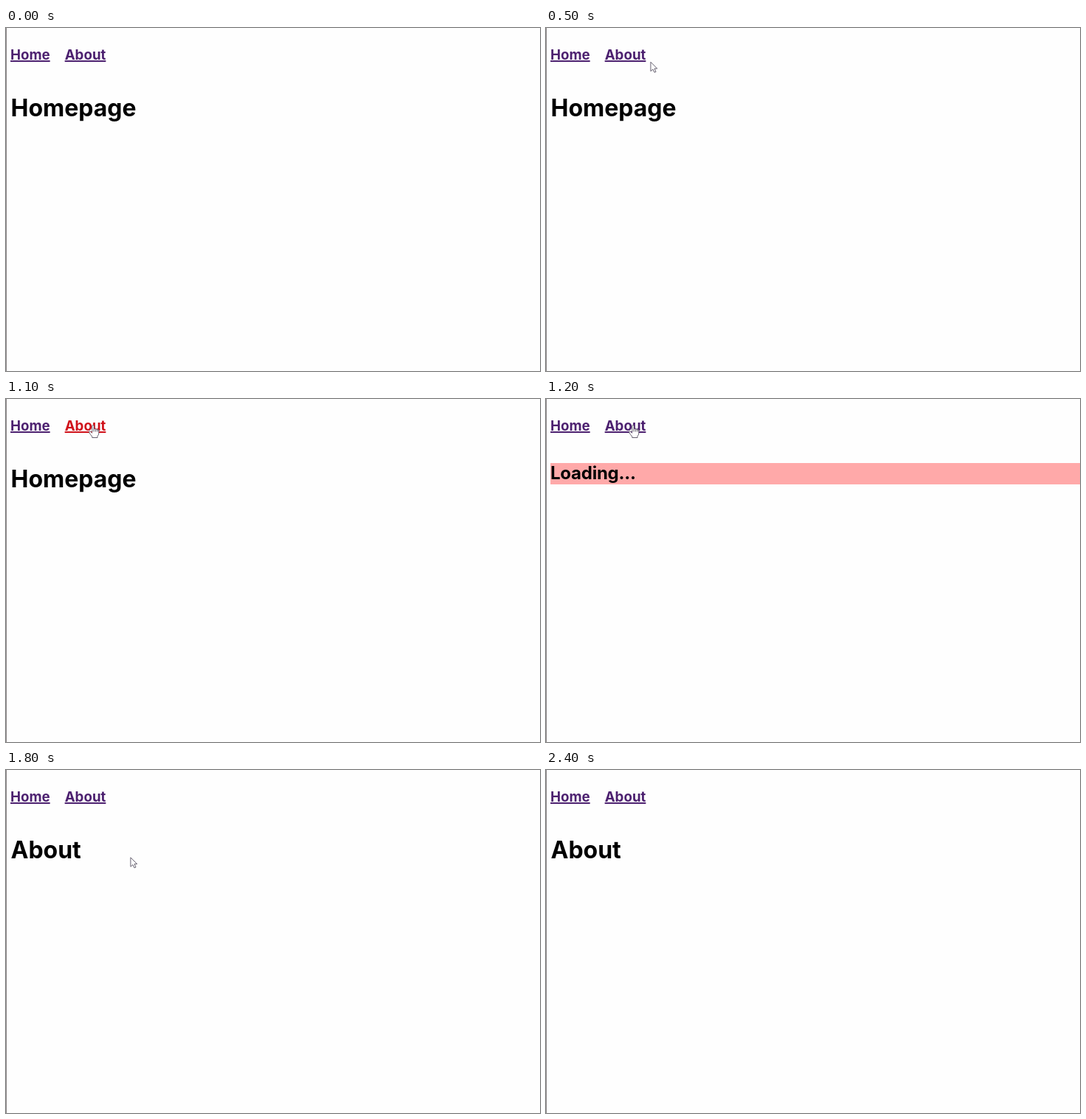
Write an HTML page that moves like this. It is 724 by 466 pixels and loops after 2.6 s.

```html
<!DOCTYPE html>
<html lang="en">
<head>
<meta charset="utf-8">
<title>Page navigation</title>
<style>
  html, body { margin: 0; width: 100%; height: 100%; overflow: hidden; background: #fefefe; }
  body { position: relative; font-family: Inter, sans-serif; font-weight: 700; color: #000; }
  body::before { content: ""; position: absolute; left: 0; top: 0; width: 1px; height: 100%; background: #8c8688; }
  nav { position: absolute; left: 6px; top: 25px; display: flex; gap: 20px; font-size: 18.72px; line-height: 23px; }
  nav span { color: #4d2170; text-decoration: underline 2px; }
  nav .active { color: #d0121b; }
  h1, h2 { position: absolute; left: 6px; right: 0; margin: 0; }
  h1 { left: 6.5px; top: 89px; font-size: 32px; line-height: 39px; }
  h2 { top: 87px; font-size: 24px; line-height: 28.5px; letter-spacing: -.01em; background: #ffa9a9; }
  svg { position: absolute; left: 0; top: 0; overflow: visible; fill: #fff; stroke: #555060; stroke-width: .9; stroke-linejoin: round; }
  [hidden] { display: none; }
</style>
</head>
<body>
<nav><span>Home</span><span id="about">About</span></nav>
<h1 id="title">Homepage</h1>
<h2 id="loading" hidden>Loading...</h2>
<svg id="pointer" width="20" height="22"><path id="shape"/></svg>
<script>
const LOOP = 2600, STEP = 100;
const $ = id => document.getElementById(id);

const ARROW = "M.5 .5V13L3.5 10.3 5.6 14.6 7.6 13.7 5.6 9.4H9.3Z";
const HAND = "M-1.2 10V1.2Q0-.3 1.2 1.2V6Q2.6 4.8 3.6 6.3 5 5.3 5.9 6.8 7.6 6 7.8 8V12" +
  "Q7.6 14 6 15.5V17.5H-1.2V16Q-3.6 13.5-5.2 10.5C-5.8 8.8-4 8.3-3 9.5L-1.2 11.5" +
  "M1.2 6V9.5M3.6 6.5V9.5M5.9 7V9.5";

const enter = { x: 329, y: 396 }, link = { x: 118, y: 35 }, leave = { x: 371, y: 453 };

// Ease-out of the given power, over 600 ms from t0
const ease = (t, t0, power) => 1 - (1 - Math.min(1, Math.max(0, (t - t0) / 600))) ** power;
const mix = (a, b, k) => a + (b - a) * k;

function pointerAt(t) {
  if (t < 1700) return [
    mix(enter.x, link.x, ease(t, 100, 2)),
    mix(enter.y, link.y, ease(t, 100, 3.2))
  ];
  const k = ease(t, 1700, 1.22);
  return [mix(link.x, leave.x, k), mix(link.y, leave.y, k)];
}

function draw(now) {
  const t = Math.floor(now % LOOP / STEP) * STEP;
  const within = (a, b) => t >= a && t < b;
  const loading = within(1200, 1500);

  $("about").className = within(1100, 1200) ? "active" : "";
  $("title").textContent = t < 1200 ? "Homepage" : "About";
  $("title").hidden = loading;
  $("loading").hidden = !loading;

  const [x, y] = pointerAt(t);
  $("pointer").style.display = within(100, 2400) ? "" : "none";
  $("pointer").style.transform = `translate(${x}px, ${y}px)`;
  $("shape").setAttribute("d", within(600, 1800) ? HAND : ARROW);
}

const start = performance.now();
function tick() {
  draw(performance.now() - start);
  requestAnimationFrame(tick);
}
tick();
</script>
</body>
</html>
```
